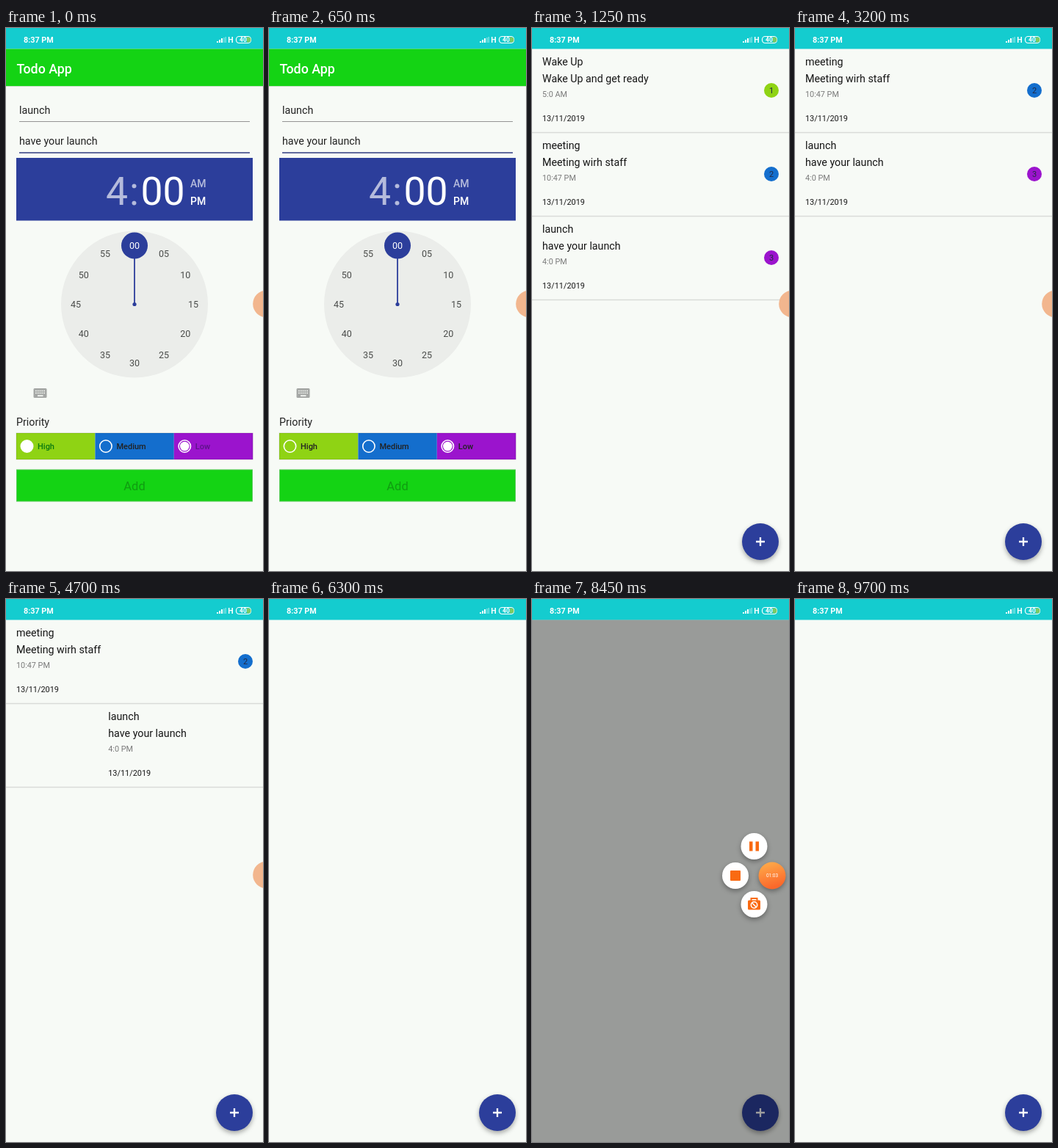
An HTML page that plays this animation: 350 by 740 pixels, repeating every 9750 ms.

```html
<!DOCTYPE html>
<html lang="en">
<head>
<meta charset="utf-8">
<title>Todo App</title>
<style>
  html, body { margin: 0; width: 100%; height: 100%; overflow: hidden; background: #f7faf6; }
  svg { display: block; font: 14.26px Roboto, sans-serif; }
  .raised { filter: drop-shadow(0 3px 3px #0005); }
  .mid { text-anchor: middle; }
  .medium { font-weight: 500; }
</style>
</head>
<body>
<svg width="350" height="740" viewBox="0 0 350 740">
  <defs>
    <linearGradient id="warm" x2="0.3" y2="1">
      <stop stop-color="#ffb04c"/><stop offset="1" stop-color="#fb682b"/>
    </linearGradient>
  </defs>

  <g id="list">
    <rect width="350" height="740" fill="#f7faf6"/>
    <g id="rows"></g>
    <g id="fab">
      <circle class="raised" cx="311" cy="700" r="25" fill="#2c3e9b"/>
      <path d="M305 700h12M311 694v12" stroke="#fff" stroke-width="2.3"/>
    </g>
    <rect width="350" height="28.5" fill="#14cccf"/>
  </g>
  <rect id="shade" width="350" height="740"/>

  <g id="form">
    <rect width="350" height="740" fill="#f7faf6"/>
    <rect width="350" height="28.5" fill="#14cccf"/>
    <rect y="28.5" width="350" height="50.5" fill="#14d314"/>
    <rect y="79" width="350" height="1" fill="#c9dfc8"/>
    <text class="medium" x="14.5" y="61.5" font-size="17.8" fill="#fff">Todo App</text>
    <g fill="#222">
      <text x="18" y="117">launch</text>
      <text x="18" y="159">have your launch</text>
      <text x="14" y="541.5">Priority</text>
    </g>
    <path d="M18 127.5h314" stroke="#949494"/>
    <path d="M18 170h314" stroke="#2f3b80" stroke-width="1.6"/>
    <rect x="14" y="177" width="322" height="85.5" fill="#2c3e9b"/>
    <g fill="#fff" font-size="53.5">
      <text x="136" y="241" opacity=".65">4</text>
      <text x="168" y="241" opacity=".65">:</text>
      <text x="183.5" y="241">00</text>
    </g>
    <g fill="#fff" font-size="14" class="medium">
      <text x="251" y="217" opacity=".65">AM</text>
      <text x="251" y="241">PM</text>
    </g>
    <circle cx="175" cy="376.5" r="100" fill="#ebedea"/>
    <path d="M175 376.5V297" stroke="#2c3e9b" stroke-width="1.8"/>
    <circle cx="175" cy="376.5" r="2.6" fill="#2c3e9b"/>
    <circle cx="175" cy="296.5" r="18" fill="#2c3e9b"/>
    <g id="dial" class="mid" font-size="12.5"></g>
    <rect x="37.5" y="491" width="18" height="13" rx="1.5" fill="#a5a7a5"/>
    <path d="M40 494.5h14M40 497.5h14" stroke="#f7faf6" stroke-width="1.6" stroke-dasharray="1.7 1.1"/>
    <path d="M43 501.2h7.5" stroke="#f7faf6" stroke-width="1.7"/>
    <g id="priority"></g>
    <rect x="14.5" y="602" width="321" height="43" fill="#14d314" stroke="#55c955"/>
    <text class="mid" x="175" y="630" font-size="16.5" fill="#0f9d10">Add</text>
  </g>

  <g fill="#fff">
    <text x="24" y="20" font-size="10.8" font-weight="700">8:37 PM</text>
    <path d="M287 20v-2h2v2zM290 20v-4h2v4zM293 20v-6h2v6z"/>
    <path d="M296 20v-7h1.6v7zM298.4 20v-8h1.6v8z" opacity=".4"/>
    <text x="302.3" y="20" font-size="10.5" font-weight="700">H</text>
    <rect x="313.5" y="11.5" width="20" height="9" rx="4" fill="none" stroke="#fff" stroke-width="1.2"/>
    <path d="M328 12.5h2a3.5 3.5 0 0 1 0 7h-2z" fill="#7ccb62"/>
    <text class="mid" x="323" y="19.2" font-size="8.5" font-weight="700">40</text>
  </g>

  <rect id="dim" y="28.5" width="350" height="711.5"/>
  <g id="menu" fill="#f96a12">
    <g>
      <circle class="raised" r="18" fill="#fff"/>
      <path d="M-6.5-6.5h4.5v13h-4.5zM2-6.5h4.5v13H2z"/>
    </g>
    <g>
      <circle class="raised" r="18" fill="#fff"/>
      <rect x="-7" y="-7" width="14" height="14" rx="1"/>
    </g>
    <g>
      <circle class="raised" r="18" fill="#fff"/>
      <path d="M-4-5v-3h8v3" fill="none" stroke="#f96a12" stroke-width="2"/>
      <rect x="-8.5" y="-5.5" width="17" height="13" rx="1.5"/>
      <circle cy="1" r="4.2" fill="none" stroke="#fff" stroke-width="1.5"/>
      <path d="M-3-2l6 6" stroke="#fff" stroke-width="1.5"/>
    </g>
    <g>
      <circle class="raised" r="18.5" fill="url(#warm)"/>
      <text class="mid" y="2.3" font-size="6.5" fill="#fff">01:03</text>
    </g>
  </g>
  <circle id="ball" cx="354.5" cy="376" r="18.3" fill="#f2b68e"/>
</svg>

<script>
const LOOP = 9750;
const $ = id => document.getElementById(id);
const ramp = (t, from, to) => Math.min(1, Math.max(0, (t - from) / (to - from)));
const move = (el, x, y = 0, scale = 1) =>
  el.setAttribute('transform', `translate(${x} ${y}) scale(${scale})`);
const show = (el, on) => el.setAttribute('visibility', on ? 'visible' : 'hidden');
const fade = (el, alpha) => el.setAttribute('opacity', alpha);

const levels = [
  { name: 'High', color: '#8fd314' },
  { name: 'Medium', color: '#146ecd' },
  { name: 'Low', color: '#9b14cd' }
];
// swipe: start and end of the leaving drag; the row is dropped at "gone"
const tasks = [
  { title: 'Wake Up', note: 'Wake Up and get ready', time: '5:0 AM', level: 1, swipe: [2500, 2850], gone: 2900 },
  { title: 'meeting', note: 'Meeting wirh staff', time: '10:47 PM', level: 2, swipe: [5350, 5600], gone: 5650 },
  { title: 'launch', note: 'have your launch', time: '4:0 PM', level: 3, swipe: [4600, 4900], gone: 4950 }
];

$('rows').innerHTML = tasks.map(k => `<g>
  <g fill="#161616">
    <text x="14" y="23">${k.title}</text>
    <text x="14" y="46">${k.note}</text>
    <text x="14" y="66" font-size="10.8" fill="#7a7a7a">${k.time}</text>
    <text x="14" y="99" font-size="10.9">13/11/2019</text>
    <circle cx="326" cy="57" r="10" fill="${levels[k.level - 1].color}"/>
    <text class="mid" x="326" y="61" font-size="11" fill="#222a44">${k.level}</text>
  </g>
  <path d="M0 114.5h350" stroke="#d9dbd8" stroke-width="1.4"/>
</g>`).join('');

$('dial').innerHTML = Array.from({ length: 12 }, (_, i) => {
  const a = i * Math.PI / 6;
  return `<text x="${175 + 80 * Math.sin(a)}" y="${381 - 80 * Math.cos(a)}"
    fill="${i ? '#4a4c4a' : '#fff'}">${String(i * 5).padStart(2, '0')}</text>`;
}).join('');

$('priority').innerHTML = levels.map(({ name, color }, i) => `
  <g transform="translate(${14 + i * 107.4} 552)">
    <rect width="107.4" height="36" fill="${color}"/>
    <circle cx="14.5" cy="18" r="8.2" fill="none" stroke="#fff" stroke-width="1.6"/>
    <circle class="dot" cx="14.5" cy="18" r="${i ? 6.3 : 8.2}" fill="#fff"/>
    <text class="medium" x="29" y="22" font-size="11" fill="#222">${name}</text>
  </g>`).join('') + '<rect x="14" y="552" width="322" height="36" fill="none" stroke="#0002"/>';

const dots = document.querySelectorAll('.dot');
const labels = $('priority').querySelectorAll('text');
const rows = [...$('rows').children];
const buttons = [...$('menu').children];
const spots = [[302.5, 337], [277, 377], [302.5, 416], [327, 377]];

// two drags of the last row that spring back
const tug = (t, from, to, reach) => reach * Math.sin(Math.PI * ramp(t, from, to)) ** 2;

function drawForm(t) {
  const left = (1 - ramp(t, 750, 1250)) ** 4.4;
  move($('form'), 350 * (1 - left));
  show($('form'), t < 1250);
  move($('list'), -105 * left);
  fade($('shade'), 0.5 * left);
  fade(dots[0], 1 - ramp(t, 50, 250));
  fade(dots[1], 0);
  labels[0].setAttribute('fill', t < 50 ? '#0b7a10' : '#222');
  labels[2].setAttribute('fill', t < 50 ? '#5c1488' : '#222');
}

function drawRows(t) {
  let slot = 0;
  tasks.forEach((task, i) => {
    const here = t < task.gone;
    show(rows[i], here);
    if (!here) return;
    move(rows[i], 0, 28 + 114 * slot++);
    let dx = 372 * ramp(t, ...task.swipe);
    if (i === 2) dx += tug(t, 3200, 3800, 60) + tug(t, 3950, 4400, 70);
    move(rows[i].firstElementChild, dx);
  });
}

function drawMenu(t) {
  const open = ramp(t, 6450, 6800) * (1 - ramp(t, 8650, 9150));
  const p = 1 - (1 - open) ** 2;
  fade($('dim'), 0.38 * p);
  fade($('menu'), Math.min(1, p * 2));
  show($('menu'), p > 0);
  buttons.forEach((button, i) => {
    const [x, y] = spots[i];
    move(button, 355 + (x - 355) * p, 377 + (y - 377) * p, i < 3 ? p : 1);
  });
  fade($('ball'), 1 - ramp(t, 6100, 6300));
}

function frame(now) {
  const t = now % LOOP;
  drawForm(t);
  drawRows(t);
  drawMenu(t);
  requestAnimationFrame(frame);
}
frame(0);
</script>
</body>
</html>
```
